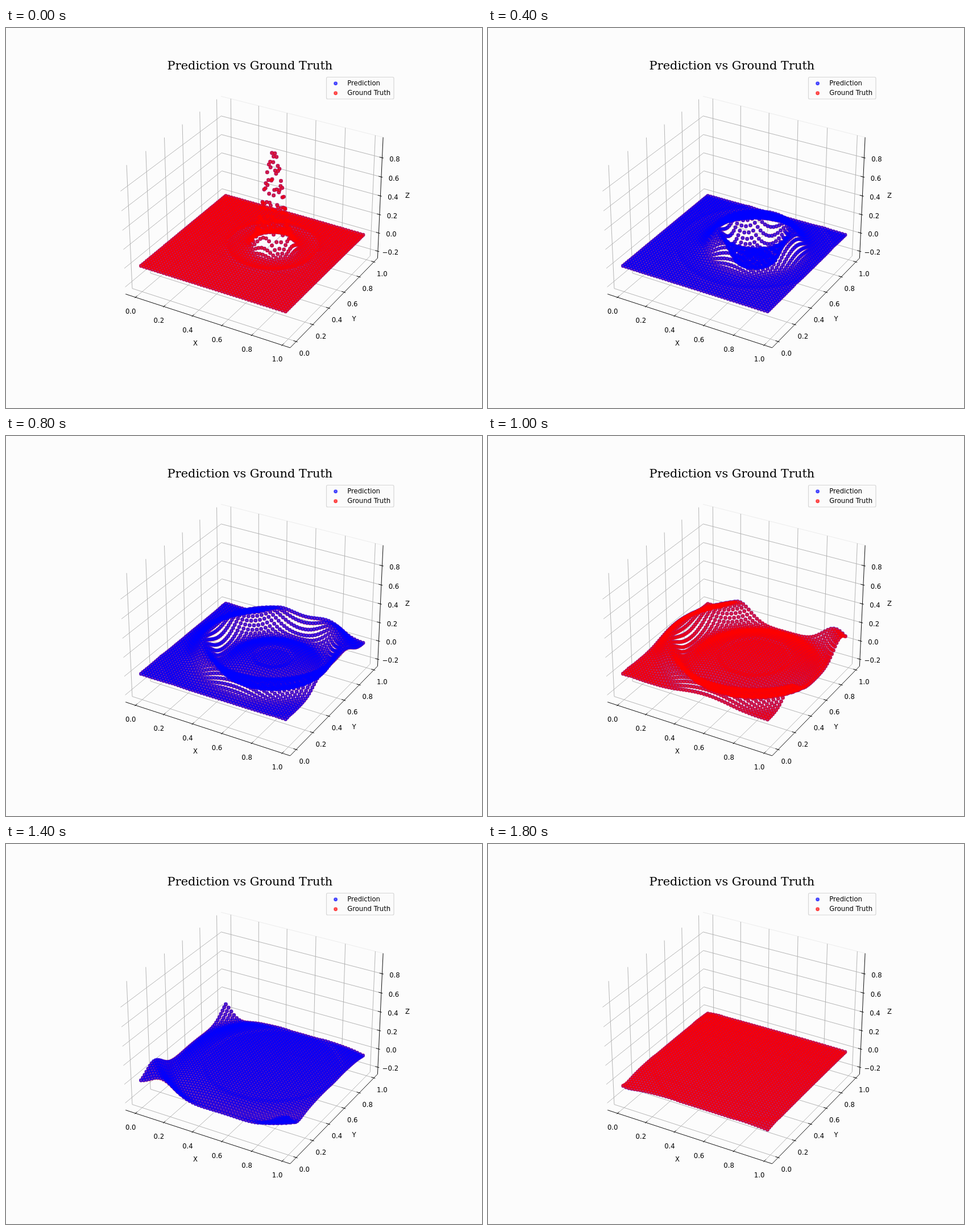
An HTML page with a canvas for the animation above (2000 ms loop, 837 by 669 pixels).

```html
<!DOCTYPE html>
<html lang="en">
<head>
<meta charset="utf-8">
<title>Prediction vs Ground Truth</title>
<style>
  html, body { margin: 0; width: 100%; height: 100%; overflow: hidden; background: #fcfcfc; }
  canvas { display: block; }
</style>
</head>
<body>
<canvas id="stage" width="837" height="669"></canvas>
<script>
const ctx = document.getElementById('stage').getContext('2d');
const BLUE = 'rgba(0,0,255,0.6)', RED = 'rgba(255,0,0,0.6)';
const STEP_MS = 200, STEPS = 10;
const BLUE_STEPS = [1, 2, 3, 4, 6, 7, 8];   // steps with the prediction drawn on top

// Camera: elevation 30°, azimuth -60°, distance 10.
const C30 = Math.sqrt(3) / 2;
const VIEW = { cx: 435.9, cy: 330.9, scale: 2784.5 };
const EDGE = 0.5953, TOP = 0.4464;           // half sizes of the axes box
const planar = v => (v - 0.49) * 1.0602;
const vertical = z => z * 0.694 - 0.2545;

function project([x, y, z]) {
  const depth = 10 - (0.5 * C30 * x - 0.75 * y + 0.5 * z);
  return {
    x: VIEW.cx + VIEW.scale * (C30 * x + 0.5 * y) / depth,
    y: VIEW.cy - VIEW.scale * (-0.25 * x + 0.5 * C30 * y + C30 * z) / depth,
    depth
  };
}

// Circular wave released from a Gaussian bump.
const N = 50, H = 0.02, SIGMA = 0.055, TRAVEL = 0.099;
const CENTER = { x: 0.5706, y: 0.582 };

function dawson(x) {
  let sum = 0;
  for (let n = -21; n <= 21; n += 2) sum += Math.exp(-((x - n * 0.2) ** 2)) / n;
  return sum / Math.sqrt(Math.PI);
}

// Dawson's sampling series, with an asymptotic tail.
function pulse(s) {
  const t = s / (SIGMA * Math.SQRT2);
  if (t > 3.6) {
    const q = 1 / (2 * t * t);
    return -q * (1 + 3 * q + 15 * q * q + 105 * q * q * q);
  }
  return 1 - 2 * t * dawson(t);
}

const PULSE_STEP = 0.002, RADIUS_STEP = 0.005, ANGLES = 256;
const pulseTable = Array.from({ length: 1000 }, (_, i) => pulse(i * PULSE_STEP));

function lookup(table, position) {
  const i = Math.floor(position);
  return table[i] + (table[i + 1] - table[i]) * (position - i);
}

function radialProfile(step) {
  return Array.from({ length: 180 }, (_, i) => {
    let sum = 0;
    for (let a = 0; a < ANGLES; a++) {
      const s = TRAVEL * step + i * RADIUS_STEP * Math.sin(2 * Math.PI * a / ANGLES);
      sum += lookup(pulseTable, Math.abs(s) / PULSE_STEP);
    }
    return sum / ANGLES;
  });
}

function surface(step, gain) {
  const profile = radialProfile(step), points = [];
  for (let i = 0; i < N; i++) {
    for (let j = 0; j < N; j++) {
      const x = i * H, y = j * H;
      const r = Math.hypot(x - CENTER.x, y - CENTER.y);
      const z = gain * lookup(profile, r / RADIUS_STEP);
      points.push(project([planar(x), planar(y), vertical(z)]));
    }
  }
  return points.sort((a, b) => b.depth - a.depth);
}

function marker(x, y, color) {
  ctx.beginPath();
  ctx.arc(x, y, 2.6, 0, 2 * Math.PI);
  ctx.fillStyle = ctx.strokeStyle = color;
  ctx.lineWidth = 1.74;
  ctx.fill();
  ctx.stroke();
}

function polyline(color, ...corners) {
  ctx.beginPath();
  for (const corner of corners) {
    const p = project(corner);
    ctx.lineTo(p.x, p.y);
  }
  ctx.strokeStyle = color;
  ctx.lineWidth = 0.93;
  ctx.stroke();
}

function label(text, x, y, align = 'center') {
  ctx.font = '11.63px "DejaVu Sans", sans-serif';
  ctx.textAlign = align;
  ctx.fillStyle = '#000';
  ctx.fillText(text, x, y + 4.2);
}

function tick(text, at, dir, dx, dy) {
  const shifted = d => at.map((v, i) => v + dir[i] * d);
  polyline('#000', shifted(0.0095), shifted(-0.019));
  const p = project(at);
  label(text, p.x + dx, p.y + dy);
}

function drawAxes() {
  const E = EDGE, T = TOP, grid = '#b0b0b0';
  const flat = [0, 0.2, 0.4, 0.6, 0.8, 1], heights = [-0.2, 0, 0.2, 0.4, 0.6, 0.8];
  const name = v => v.toFixed(1).replace('-', '\u2212');

  polyline('#ebebeb', [-E, E, T], [E, E, T]);
  for (const v of flat) {
    const p = planar(v);
    polyline(grid, [p, -E, -T], [p, E, -T], [p, E, T]);
    polyline(grid, [E, p, -T], [-E, p, -T], [-E, p, T]);
  }
  for (const v of heights) {
    const z = vertical(v);
    polyline(grid, [-E, -E, z], [-E, E, z], [E, E, z]);
  }

  polyline('#000', [-E, -E, -T], [E, -E, -T]);
  polyline('#000', [E, -E, -T], [E, E, -T]);
  polyline('#000', [E, E, -T], [E, E, T]);
  for (const v of flat) {
    tick(name(v), [planar(v), -E, -T], [0, -1, 0], -8.6, 24.8);
    tick(name(v), [E, planar(v), -T], [1, 0, 0], 14.4, 20.7);
  }
  for (const v of heights) tick(name(v), [E, E, vertical(v)], [1, 0, 0], 22, 2.2);
  label('X', 333, 555);
  label('Y', 612, 512);
  label('Z', 706, 295);
}

function drawTitleAndLegend() {
  ctx.font = '20.91px "DejaVu Serif", "Noto Serif", serif';
  ctx.textAlign = 'center';
  ctx.fillStyle = '#000';
  ctx.fillText('Prediction vs Ground Truth', 428.96, 73.3);

  ctx.beginPath();
  ctx.roundRect(563.5, 86.5, 118.5, 38.5, 2.3);
  ctx.fillStyle = 'rgba(252,252,252,0.8)';
  ctx.strokeStyle = 'rgba(204,204,204,0.8)';
  ctx.lineWidth = 1.16;
  ctx.fill();
  ctx.stroke();
  marker(579.6, 97.6, BLUE);
  marker(579.6, 114.8, RED);
  label('Prediction', 600.2, 97, 'left');
  label('Ground Truth', 600.2, 114, 'left');
}

function draw(step) {
  ctx.fillStyle = '#fcfcfc';
  ctx.fillRect(0, 0, 837, 669);
  drawAxes();
  const layers = [
    { color: BLUE, points: surface(step, 1 + 0.005 * step) },
    { color: RED, points: surface(step, 1) }
  ];
  if (BLUE_STEPS.includes(step)) layers.reverse();
  for (const { color, points } of layers) {
    for (const p of points) marker(p.x, p.y, color);
  }
  drawTitleAndLegend();
}

const start = performance.now();
let shown = -1;
function tickFrame() {
  const step = Math.floor((performance.now() - start) / STEP_MS) % STEPS;
  if (step !== shown) draw(shown = step);
  requestAnimationFrame(tickFrame);
}
tickFrame();
</script>
</body>
</html>
```
